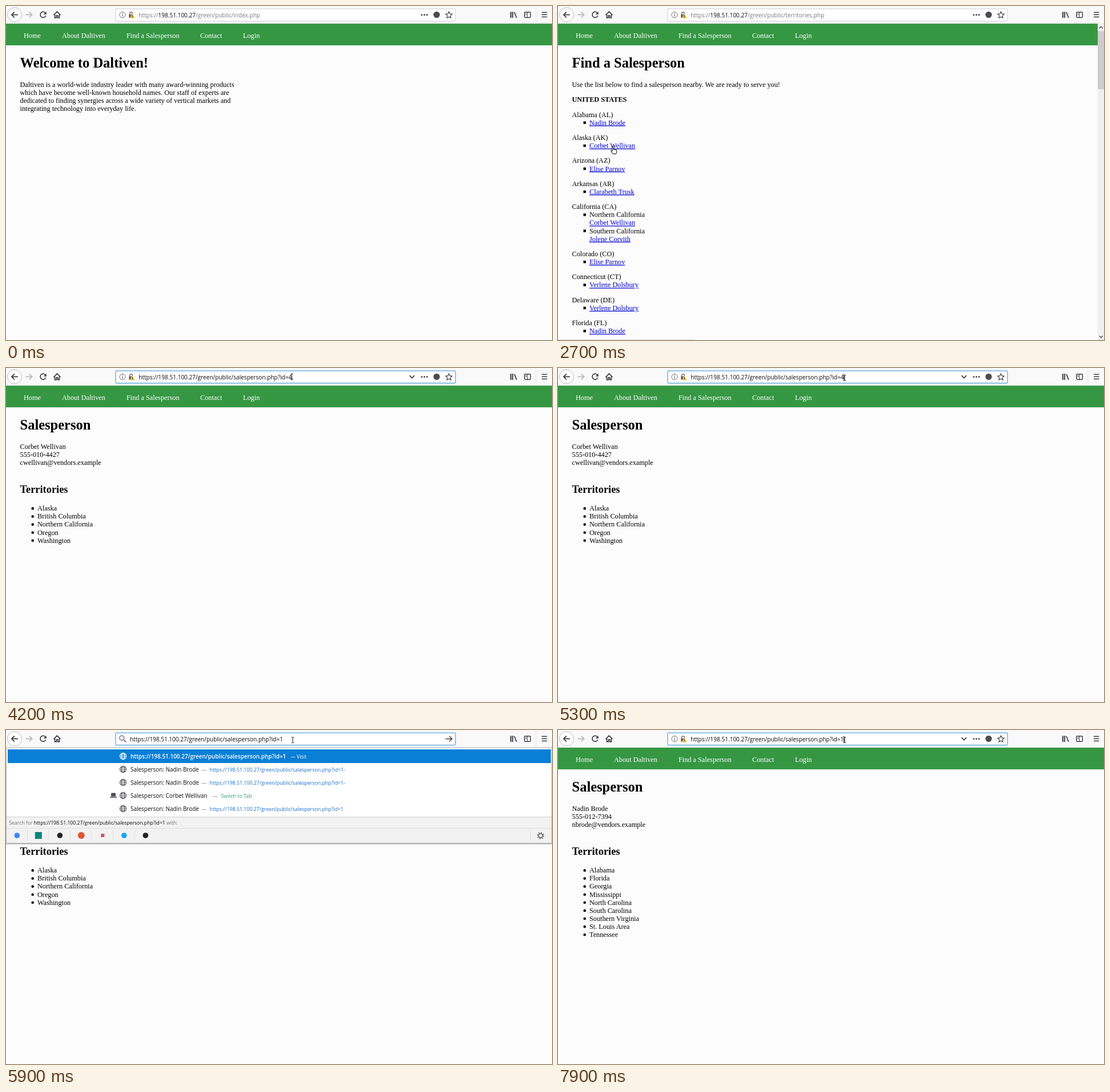
An HTML page for the animation above (8000 ms loop, 956 by 586 pixels).

```html
<!DOCTYPE html>
<html lang="en">
<head>
<meta charset="utf-8">
<title>Browser session</title>
<style>
html, body { margin: 0; width: 100%; height: 100%; overflow: hidden; background: #fcfcfc; }
svg { display: block; width: 956px; height: 586px; }
text { white-space: pre; }
.page { font: 12.25px "Liberation Serif", "Times New Roman", serif; fill: #000; }
.h1 { font-size: 24.5px; font-weight: bold; }
.h2 { font-size: 18.38px; font-weight: bold; }
.b { font-weight: bold; }
.a { fill: #0000d0; text-decoration: underline; }
.ui { font: 10.05px "Open Sans", "Noto Sans", sans-serif; fill: #0c0c0d; }
.sm { font-size: 8.8px; }
.ic { fill: none; stroke: #3f3f43; stroke-width: 1.7; }
</style>
</head>
<body>
<svg id="stage" viewBox="0 0 956 586"></svg>
<script>
const LOOP = 8000;
const HOST = '198.51.100.27', DIR = '/green/public/';
const BRAND = 'Daltiven';
const [NB, CW, EP, CT, JC, VD] = ['Nadin Brode', 'Corbet Wellivan', 'Elise Parnov',
  'Clarabeth Trusk', 'Jolene Corvith', 'Verlene Dolsbury'];
const LINE = 14.1;
const links = [];

const text = (x, y, s, cls = '', extra = '') => `<text x="${x}" y="${y}" class="${cls}" ${extra}>${s}</text>`;
const rect = (x, y, w, h, fill, extra = '') => `<rect x="${x}" y="${y}" width="${w}" height="${h}" fill="${fill}" ${extra}/>`;
const path = (d, extra = 'class="ic"') => `<path d="${d}" ${extra}/>`;
const dot = (x, y, r, fill, extra = '') => `<circle cx="${x}" cy="${y}" r="${r}" fill="${fill}" ${extra}/>`;
const group = (id, s, cls = '') => `<g id="${id}" class="${cls}">${s}</g>`;
const lines = (x, y, list, cls) => list.map((s, i) => text(x, y + i * LINE, s, cls)).join('');

function home() {
  return text(24.5, 108, `Welcome to ${BRAND}!`, 'h1') + lines(24.5, 142, [
    `${BRAND} is a world-wide industry leader with many award-winning products`,
    'which have become well-known household names. Our staff of experts are',
    'dedicated to finding synergies across a wide variety of vertical markets and',
    'integrating technology into everyday life.']);
}

function directory() {
  const states = [
    ['Alabama (AL)', NB], ['Alaska (AK)', CW], ['Arizona (AZ)', EP], ['Arkansas (AR)', CT],
    ['California (CA)', ['Northern California', CW], ['Southern California', JC]],
    ['Colorado (CO)', EP], ['Connecticut (CT)', VD], ['Delaware (DE)', VD], ['Florida (FL)', NB]];
  let s = text(24.5, 108, 'Find a Salesperson', 'h1') +
    text(24.5, 142, 'Use the list below to find a salesperson nearby. We are ready to serve you!') +
    text(24.5, 168.2, 'UNITED STATES', 'b');
  let y = 194.6;
  for (const [state, ...people] of states) {
    s += text(24.5, y, state);
    for (const p of people) {
      y += LINE;
      s += rect(44.5, y - 6.2, 4.4, 4.4, '#000');
      const [area, name] = Array.isArray(p) ? p : [null, p];
      if (area) {
        s += text(55, y, area);
        y += LINE;
      }
      s += text(55, y, name, 'a');
      links.push({ page: 'list', x: 55, y: y - 11, w: 80, h: 14 });
    }
    y += LINE + 12.2;
  }
  return s + rect(945, 31, 11, 555, '#f0f0f0') + rect(945, 44, 11, 102, '#cdcdcd') +
    path('M947.7 39.2l3-3 3 3M947.7 578.8l3 3 3-3', 'fill="none" stroke="#505050" stroke-width="1.4"');
}

function person(name, phone, mail, areas) {
  return text(24.5, 108, 'Salesperson', 'h1') + lines(24.5, 142, [name, phone, mail]) +
    text(24.5, 219, 'Territories', 'h2') + lines(55, 250.2, areas) +
    areas.map((_, i) => dot(46.7, 246.4 + i * LINE, 2.3, '#000')).join('');
}

function nav() {
  const items = [[31, 30, 'Home'], [98, 76, `About ${BRAND}`], [211, 93, 'Find a Salesperson'], [340, 38, 'Contact'], [415, 30, 'Login']];
  return rect(0, 31, 956, 38, '#369743') + items.map(([x, w, s]) => {
    links.push({ x, y: 42, w, h: 18 });
    return text(x, 55.5, s, '', 'fill="#fff"');
  }).join('');
}

function toolbar() {
  return rect(0, 0, 956, 31, '#f9f9fa') + rect(0, 30, 956, 1, '#e8e8ea') +
    dot(15, 15.3, 12.5, '#fff', 'stroke="#bcbcbe"') +
    path('M21 15.3H10M14.8 10.3l-5 5 5 5') +
    path('M34.5 15.3h11M40.7 10.3l5 5-5 5', 'class="ic" style="stroke:#b9b9bb"') +
    group('reload', path('M69.3 12.6a5 5 0 1 0 .4 4.4') + path('M70.7 9.8v5h-5z', 'fill="#3f3f43"')) +
    group('stop', path('M60.2 11l9.4 9.4M69.6 11l-9.4 9.4', 'class="ic" style="stroke:#b4b4b6"')) +
    path('M83.4 15.8l6-5.8 6 5.8M85.4 15v5.6h2.8v-3.8h2.4v3.8h2.8V15') +
    rect(192, 5, 595, 21.5, '#fff', 'id="box" rx="1"') +
    group('identity', dot(204, 15.5, 5, 'none', 'stroke="#666" stroke-width="1"') +
      path('M204 14.5v4M204 12.3v1.3', 'stroke="#666" stroke-width="1.2"') +
      path('M216.6 15v-2a2.4 2.4 0 0 1 4.8 0v2', 'fill="none" stroke="#666" stroke-width="1.4"') +
      rect(215.2, 14.6, 7, 6, '#666') +
      path('M221.5 13.8l4.3 7.6h-8.6z', 'fill="#f5b800" stroke="#fff" stroke-width=".5"') +
      path('M221.5 16.3v2.3M221.5 19.4v1', 'stroke="#3c2d00" stroke-width=".9"')) +
    group('lens', dot(202.8, 14, 4, 'none', 'stroke="#777" stroke-width="1.5"') +
      path('M205.7 17l4.6 4.3', 'stroke="#777" stroke-width="1.8"')) +
    '<text id="url" y="20" class="ui"><tspan id="scheme">https://</tspan><tspan>' + HOST + '</tspan><tspan id="tail"></tspan></text>' +
    rect(0, 10.5, 1, 11, '#000', 'id="caret"') +
    group('chevron', path('M706.5 13.2l4.3 4.3 4.3-4.3')) +
    group('actions', [728, 732.6, 737.2].map(x => dot(x, 15.5, 1.5, '#4a4a4f')).join('') +
      dot(754, 15.3, 5.6, '#4a4a4f') +
      path('M775.5 10l1.7 3.7 4 .5-3 2.7.8 4-3.5-2-3.5 2 .8-4-3-2.7 4-.5z', 'class="ic" style="stroke-width:1.2"')) +
    group('go', path('M769.5 15.5h11M776 10.7l5 4.8-5 4.8', 'class="ic" style="stroke-width:1.4"')) +
    path('M884 10.3v10.4M887.2 10.3v10.4M890 10.6l4 10') +
    path('M884 10.3v10.4M887.2 10.3v10.4') +
    rect(907.8, 10.8, 10.6, 9.4, 'none', 'rx="1.6" class="ic" style="stroke-width:1.5"') +
    path('M912.8 11v9M909.5 13.4h2M909.5 15.4h2', 'class="ic" style="stroke-width:1"') +
    rect(927.5, 3, 1, 25, '#e4e4e6') +
    path('M938 11.3h9.4M938 15.3h9.4M938 19.3h9.4', 'class="ic" style="stroke-width:1.6"');
}

function globe(y, color) {
  return `<g fill="none" stroke="${color}" stroke-width="1.1">${dot(205, y, 5.6, 'none')}` +
    `<ellipse cx="205" cy="${y}" rx="2.6" ry="5.6"/><path d="M199.5 ${y}h11M200.4 ${y - 3}h9.2M200.4 ${y + 3}h9.2"/></g>`;
}

function dropdown() {
  const full = `https://${HOST}${DIR}salesperson.php?id=`;
  const rows = [[NB, 342, full + '1-'], [NB, 342, full + '1-'], [CW, 362, 'Switch to Tab'], [NB, 342, full + '1']];
  let s = rect(0, 199, 956, 1.6, '#000', 'opacity=".28"') +
    rect(.5, 31, 955, 167.5, '#fff', 'stroke="#b5b5b7"') + rect(3, 34, 951, 24, '#0a7fd6') + globe(46, '#fff') +
    text(218, 50, `<tspan class="typed">${full}</tspan>`, '', 'fill="#fff" style="fill:#fff;font-size:9.95px;font-weight:600"') +
    text(498, 50, '— Visit', 'sm', 'style="fill:#fff"');
  rows.forEach(([name, x, sub], i) => {
    const y = 69 + i * 23, tab = i === 2;
    s += globe(y, '#58585c') + text(218, y + 4.3, `Salesperson: ${name}`, '', 'style="font-size:9.95px"') +
      text(x, y + 4.3, '—', 'sm', 'style="fill:#777"') +
      text(x + 14.5, y + 4.3, sub, 'sm', `style="fill:${tab ? '#2a9d78' : '#1a6fc9'}"`);
    if (tab) s += rect(184, y - 4.5, 8, 6, '#4a4a4f', 'rx="1"') + rect(182, y + 2, 12, 1.6, '#4a4a4f');
  });
  s += rect(1, 152.5, 954, 45.5, '#f2f2f3') + rect(1, 152, 954, 1, '#d4d4d6') + rect(1, 172, 954, 1, '#dedee0') +
    text(5.5, 166.2, `<tspan fill="#737373">Search for </tspan><tspan class="typed">${full}</tspan><tspan fill="#737373"> with:</tspan>`, '', 'style="font-size:8.65px"');
  ['#4285f4', '#0d857b', '#222', '#de5833', '#c9566a', '#1da1f2', '#222'].forEach((c, i) => {
    const x = 19.3 + i * 37.5;
    s += i === 1 ? rect(x - 6, 179, 12, 12, c) : i === 4 ? rect(x - 3, 182, 6, 6, c) : dot(x, 185, i === 3 ? 6 : 4.8, c);
    if (i < 6) s += rect(37 + i * 37.5, 176, 1, 18, '#dcdcde');
  });
  return s + rect(918, 176, 1, 18, '#dcdcde') + dot(936, 185.3, 3.5, 'none', 'stroke="#4a4a4f" stroke-width="1.3"') +
    dot(936, 185.3, 5.2, 'none', 'stroke="#4a4a4f" stroke-width="2" stroke-dasharray="1.6 2.484"');
}

function cursors() {
  const ink = 'fill="#fff" stroke="#000" stroke-width="1" stroke-linejoin="round"';
  return group('arrow', path('M0 0v12.5l2.9-2.7 1.9 4.4 1.9-.8-1.9-4.3h4z', ink)) +
    group('hand', path('M-1 1.2q1-1.4 2 0v5q1-.9 2 .2 1.100-.6 2 .5 1.500-.4 1.800 1v3l-1.300 3.100h-5.500l-3.300-5q-.2-1.500 1.300-.7l1 1z', ink)) +
    group('beam', path('M-2 -4.8h1.500L0 -4.300l.5-.5H2M-2 4.800h1.500L0 4.300l.5.5H2M0 -4.300v8.600', 'fill="none" stroke="#111" stroke-width="1"'));
}

document.getElementById('stage').innerHTML = rect(0, 0, 956, 586, '#fcfcfc') +
  group('content', nav() + group('home', home()) + group('list', directory()) +
    group('first', person(CW, '555-010-4427', 'cwellivan@vendors.example',
      ['Alaska', 'British Columbia', 'Northern California', 'Oregon', 'Washington'])) +
    group('second', person(NB, '555-012-7394', 'nbrode@vendors.example',
      ['Alabama', 'Florida', 'Georgia', 'Mississippi', 'North Carolina', 'South Carolina',
        'Southern Virginia', 'St. Louis Area', 'Tennessee'])), 'page') +
  rect(0, 585, 0, 1, '#dcdcde', 'id="status"') +
  toolbar() + group('menu', dropdown(), 'ui') + group('pointer', cursors());

const el = {};
document.querySelectorAll('[id]').forEach(n => el[n.id] = n);
const typed = [...document.querySelectorAll('.typed')].map(node => ({ node, base: node.textContent }));
const show = (id, on) => { el[id].style.display = on ? '' : 'none'; };
const within = (t, a, b) => t >= a && t < b;

// Pointer tip: time, x, y
const track = [[200, 640, 470], [1000, 256, 53.5], [1500, 256, 53.5], [2400, 96, 245.5],
  [3300, 96, 245.5], [4100, 500.5, 15], [4600, 500.5, 15], [5000, 502, 17.5], [LOOP, 502, 17.5]];

function pointerAt(t) {
  const i = Math.max(1, track.findIndex(k => k[0] > t));
  const [t0, x0, y0] = track[i - 1], [t1, x1, y1] = track[i];
  const p = Math.max(0, (t - t0) / (t1 - t0)), e = p * p * (3 - 2 * p);
  return [x0 + (x1 - x0) * e, y0 + (y1 - y0) * e];
}

function draw(t) {
  const page = t < 1200 ? 'home' : t < 3000 ? 'list' : t < 6600 ? 'first' : 'second';
  for (const id of ['home', 'list', 'first', 'second']) show(id, id === page);

  const open = within(t, 5400, 6300);
  const focus = within(t, 4100, 6300) || t >= 7500;
  const busy = within(t, 1100, 1400) || within(t, 2900, 3200) || within(t, 6300, 6700);
  const [x, y] = pointerAt(t);
  const inBar = y < 27 && x > 192 && x < 787;
  show('reload', !busy);
  show('stop', busy);
  show('menu', open);
  show('lens', open);
  show('go', open);
  show('identity', !open);
  show('actions', !open);
  show('chevron', !open && (focus || inBar));
  el.box.setAttribute('stroke', focus ? '#2f8fd0' : '#cfcfd1');

  const id = t < 5400 ? '4' : t < 5700 ? '' : '1';
  const file = page === 'home' ? 'index.php' : page === 'list' ? 'territories.php' : 'salesperson.php?id=' + id;
  const left = open ? 217 : 232.3;
  el.tail.textContent = DIR + file;
  el.scheme.style.fill = el.tail.style.fill = focus ? '#0c0c0d' : '#7b7b7f';
  el.url.setAttribute('x', left);
  typed.forEach(({ node, base }) => { node.textContent = base + id; });

  const since = t - (t >= 7500 ? 7500 : open ? 5400 : 4100);
  show('caret', focus && since % 1000 < 500);
  el.caret.setAttribute('x', Math.round(left + el.url.getComputedTextLength()));

  const over = links.some(l => (!l.page || l.page === page) && x >= l.x && x <= l.x + l.w && y >= l.y && y <= l.y + l.h);
  show('pointer', t >= 200);
  show('beam', inBar);
  show('hand', over && !inBar);
  show('arrow', !over && !inBar);
  el.pointer.setAttribute('transform', `translate(${x.toFixed(1)} ${y.toFixed(1)})`);
  el.status.setAttribute('width', !over ? 0 : page === 'home' ? 208 : page === 'list' && t > 1600 ? 238 : 0);
}

function tick() {
  draw(Math.floor(performance.now() % LOOP / 100) * 100);
  requestAnimationFrame(tick);
}
tick();
</script>
</body>
</html>
```
